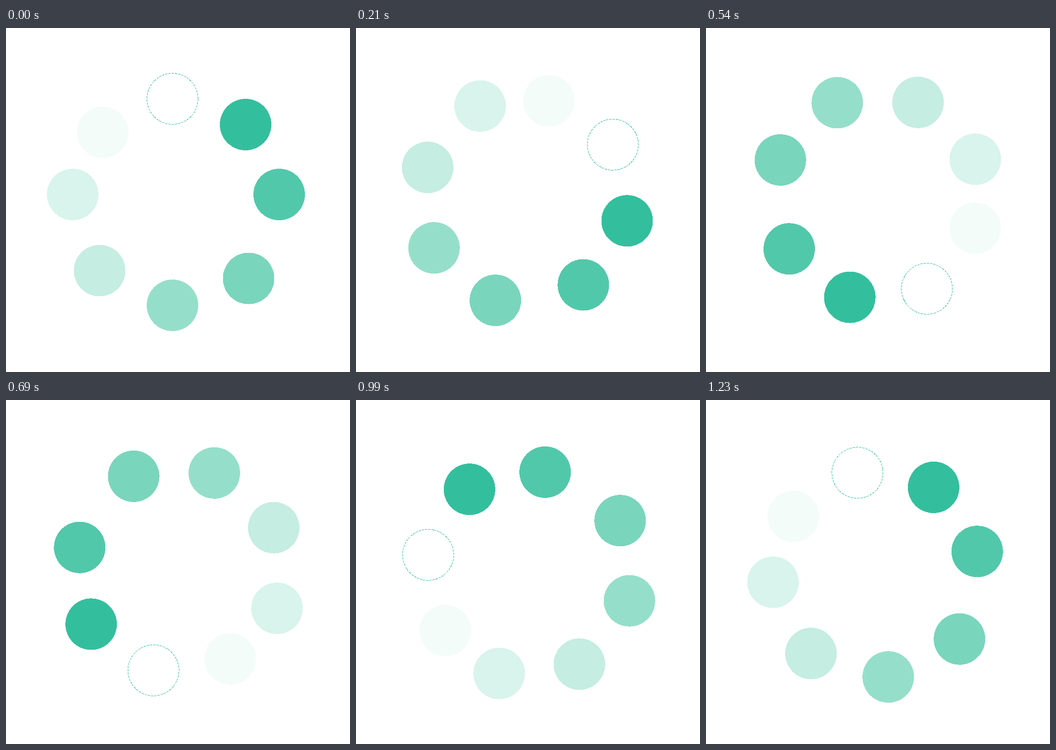
An HTML page that plays this animation: 748 px wide and 748 px high, repeating every 1.26 s.

```html
<!DOCTYPE html>
<html lang="en">
<head>
<meta charset="utf-8">
<title>Spinner</title>
<style>
  html, body { margin: 0; width: 100%; height: 100%; overflow: hidden; background: #fff; }
  svg { display: block; width: 100%; height: 100%; }
</style>
</head>
<body>
<svg viewBox="0 0 748 748" shape-rendering="crispEdges">
  <g id="ring">
    <circle cx="362" cy="154" r="55.5" fill="#fff" stroke="#26bc98" stroke-dasharray="5 2"/>
    <circle cx="521" cy="210" r="56" fill="#33bf9d"/>
    <circle cx="594" cy="362" r="56" fill="#52c8ab"/>
    <circle cx="527.5" cy="544.5" r="56" fill="#7ad5bd"/>
    <circle cx="362" cy="603" r="56" fill="#95dfca"/>
    <circle cx="203.5" cy="527.5" r="56" fill="#c5ede2"/>
    <circle cx="145" cy="362" r="56" fill="#d8f4ec"/>
    <circle cx="210" cy="227" r="56" fill="#f4fcfa"/>
  </g>
</svg>
<script>
  const LOOP = 1260, STEP = 30;
  const ring = document.getElementById('ring');

  function draw() {
    const time = performance.now() % LOOP;
    const angle = Math.floor(time / STEP) * STEP / LOOP * 360;
    ring.setAttribute('transform', `rotate(${angle} 374 374)`);
    requestAnimationFrame(draw);
  }
  draw();
</script>
</body>
</html>
```
